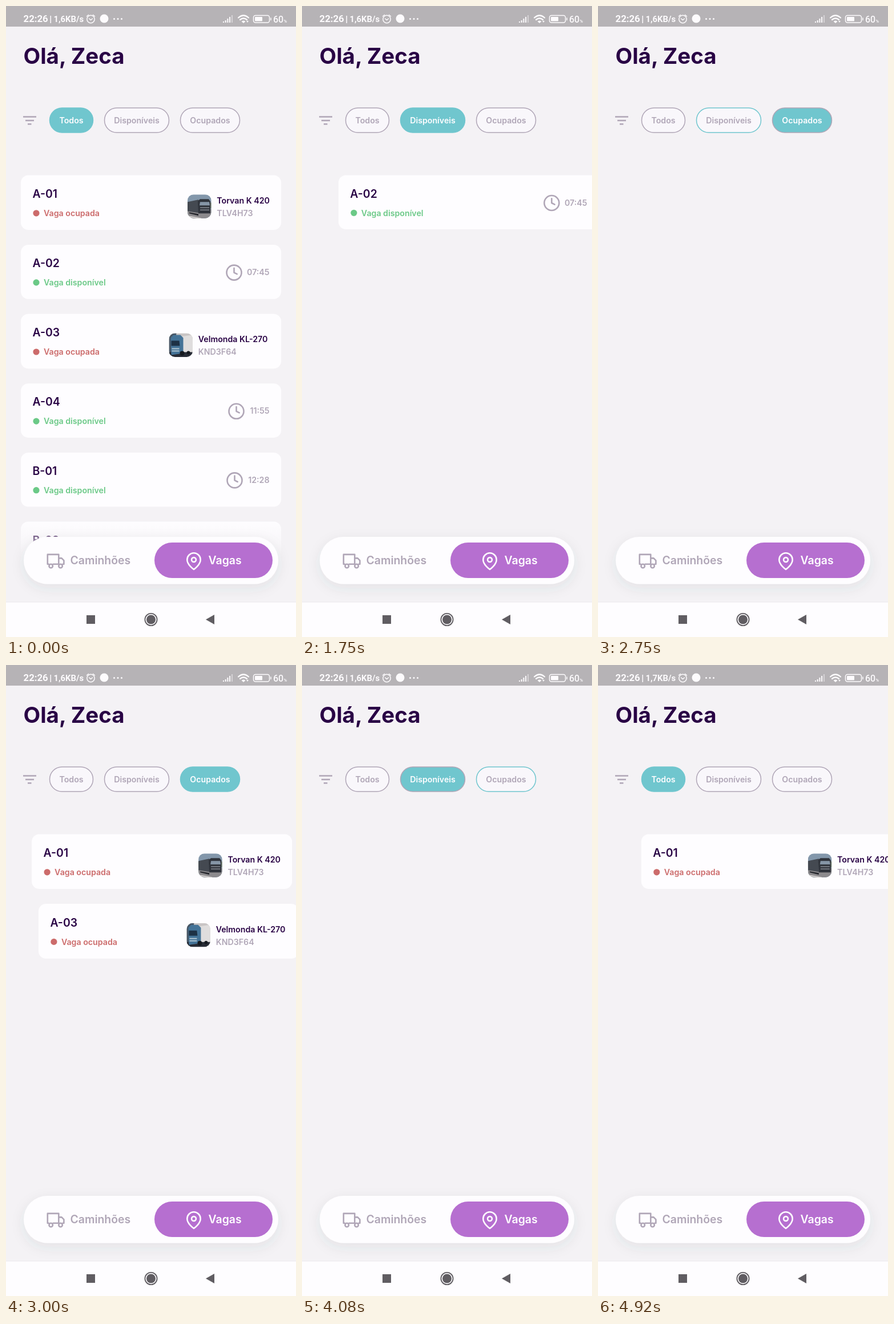
Recreate the animation shown at these times as an HTML page. Size 508 by 1102 pixels, loop 5010 ms.

```html
<!DOCTYPE html>
<html lang="pt">
<head>
<meta charset="utf-8">
<style>
  html, body { margin: 0; width: 100%; height: 100%; overflow: hidden; background: #f4f2f5; }
  svg { display: block; width: 100%; height: 100%; font: 600 14.2px Inter, sans-serif; }
  .title { font-size: 19.4px; fill: #290345; }
  .dark { fill: #290345; }
  .grey { fill: #b0a6b7; }
  .line { fill: none; stroke-width: 2; stroke-linecap: round; stroke-linejoin: round; }
  .greyLine { stroke: #b0a6b7; }
  .card { fill: #fefdff; }
  .status text { font-family: Roboto, sans-serif; font-weight: 600; fill: #fdfbfd; }
</style>
</head>
<body>
<svg viewBox="0 0 508 1102">
  <defs>
    <linearGradient id="fade" x2="0" y2="1">
      <stop stop-color="#f4f2f5" stop-opacity="0"/>
      <stop offset="1" stop-color="#f4f2f5"/>
    </linearGradient>
    <filter id="shadow" x="-20%" y="-60%" width="140%" height="220%">
      <feDropShadow dx="0" dy="7" stdDeviation="11" flood-color="#405848" flood-opacity=".09"/>
    </filter>
    <clipPath id="round"><rect width="41.5" height="41.5" rx="10.5"/></clipPath>
    <g id="clock" class="line greyLine">
      <circle r="10"/><path d="M0-6V0l4 2"/>
    </g>
    <g id="darkTruck" clip-path="url(#round)">
      <rect width="42" height="42" fill="#8397ab"/>
      <path d="M0 14H42V24H0Z" fill="#75806f"/>
      <path d="M0 27L42 25V42H0Z" fill="#8c8a8d"/>
      <path d="M0 13L19 9V32L0 29Z" fill="#444951"/>
      <path d="M18 11l4-3H37l3 4V33H19Z" fill="#30343c"/>
      <path d="M22 13H38l1 6H21Z" fill="#8696a7"/>
      <path d="M22 23H38M22 27H38" stroke="#858991" stroke-width="1.5"/>
      <path d="M3 31l16 3v3L3 33Z" fill="#25272d"/>
      <path d="M0 38L24 42" stroke="#dad7d5" stroke-width="2"/>
    </g>
    <g id="blueTruck" clip-path="url(#round)">
      <rect width="42" height="42" fill="#c9c5c5"/>
      <path d="M0 0H13L7 42H0Z" fill="#485767"/>
      <path d="M20 6L42 3V34H20Z" fill="#dfdddd"/>
      <path d="M0 33H42V42H0Z" fill="#282c36"/>
      <path d="M3 8L8 3H20l5 5V35L4 38Z" fill="#447397"/>
      <path d="M4 13H18l1 9H4Z" fill="#1d3145"/>
      <path d="M5 27H18M5 31H18" stroke="#b0c5d2" stroke-width="2"/>
      <circle cx="23" cy="35" r="4" fill="#15191f"/>
      <circle cx="34" cy="34" r="3" fill="#15191f"/>
    </g>
  </defs>

  <rect width="508" height="1102" fill="#f4f2f5"/>
  <text class="dark" x="30.5" y="100.5" style="font-size:38.5px;font-weight:700">Olá, Zeca</text>
  <path d="M30 193.5H53M34 200H49M38 206.3H44.500" stroke="#b0a6b7" stroke-width="2.6"/>
  <g id="tabs"></g>
  <g id="lists"></g>

  <rect y="900" width="508" height="65" fill="url(#fade)"/>
  <rect y="965" width="508" height="80" fill="#f4f2f5"/>
  <rect x="31" y="927" width="446" height="82.500" rx="41.2" class="card" filter="url(#shadow)"/>
  <rect x="260" y="937" width="207" height="62" rx="31" fill="#b66fd0"/>
  <g class="line greyLine" transform="translate(71.500 954) scale(1.3)">
    <path d="M2.500 16H1V3H16V16H8.500M16 8h4l3 3v5h-1.500"/>
    <circle cx="5.500" cy="18.500" r="2.500"/><circle cx="18.500" cy="18.500" r="2.500"/>
  </g>
  <text class="grey" x="112.500" y="975" style="font-size:19.4px">Caminhões</text>
  <g class="line" stroke="#fefdff" transform="translate(313.400 954) scale(1.3)">
    <path d="M21 10c0 7-9 13-9 13s-9-6-9-13a9 9 0 0 1 18 0z"/><circle cx="12" cy="10" r="3"/>
  </g>
  <text x="354.500" y="975" fill="#fefdff" style="font-size:19.4px">Vagas</text>

  <rect y="1041" width="508" height="61" fill="#fefdff"/>
  <rect y="1040.500" width="508" height="1" fill="#ebe9ec"/>
  <g fill="#605d62">
    <rect x="141" y="1064" width="15" height="15"/>
    <circle cx="254" cy="1071.500" r="8"/>
    <circle cx="254" cy="1071.500" r="10.600" fill="none" stroke="#605d62" stroke-width="1.800"/>
    <path d="M350 1071.500L365 1063V1080Z"/>
  </g>

  <g class="status">
    <rect width="508" height="36" fill="#b6b3b6"/>
    <text x="30.500" y="28" style="font-size:16.800px">22:26</text>
    <rect x="77.500" y="17" width="1.500" height="13" fill="#fdfbfd"/>
    <text id="speed" x="83.500" y="28" style="font-size:14.800px"></text>
    <g fill="none" stroke="#fdfbfd" stroke-width="1.500" stroke-linecap="round">
      <circle cx="148.500" cy="23" r="6.700"/>
      <path d="M141.500 18l3-2.500M155.500 18l-3-2.500M145.500 22l3 2.500 3-2.500"/>
      <path d="M407 20.500q9-8 18 0M410 24q6-5 12 0" stroke-width="2.300"/>
      <rect x="433.500" y="16.500" width="28" height="12.500" rx="3.500"/>
      <path d="M464 21v3.500"/>
    </g>
    <g fill="#fdfbfd">
      <circle cx="172" cy="22" r="7.500"/>
      <circle cx="189.500" cy="22.500" r="1.500"/><circle cx="196" cy="22.500" r="1.500"/><circle cx="202.500" cy="22.500" r="1.500"/>
      <path d="M380 27h2v2h-2zM383.700 25h2v4h-2zM387.400 22h2v7h-2zM391.100 19h2v10h-2z"/>
      <path d="M395 16h2v13h-2z" opacity=".45"/>
      <path d="M412.500 27q3.500-3 7 0l-3.500 3zM421 26h4l-2 3z"/>
      <rect x="436" y="19" width="13" height="7.500" rx="1"/>
    </g>
    <text x="468" y="28.500" style="font-size:16px;font-weight:500">60</text>
    <text x="486.500" y="28.500" style="font-size:7.500px">%</text>
  </g>
</svg>
<script>
const LOOP = 5010, SHIFT = 50.8, SLIDE = 300, STAGGER = 50;
const TEAL = '#70c6ce', GREY = '#b0a6b7';
const $ = id => document.getElementById(id);

const spots = [
  { id: 'A-01', truck: 'Torvan K 420', plate: 'TLV4H73', photo: 'darkTruck', x: 318 },
  { id: 'A-02', time: '07:45', x: 399.5 },
  { id: 'A-03', truck: 'Velmonda KL-270', plate: 'KND3F64', photo: 'blueTruck', x: 285.5 },
  { id: 'A-04', time: '11:55', x: 403.5 },
  { id: 'B-01', time: '12:28', x: 400.5 },
  { id: 'B-02', time: '12:28', x: 400.5 },
];
const tabs = [
  { label: 'Todos', x: 76.5, w: 76, keep: () => true },
  { label: 'Disponíveis', x: 172.5, w: 113, keep: s => s.time },
  { label: 'Ocupados', x: 305.5, w: 104, keep: s => s.truck },
];
// tap time, chosen tab, moment the first card appears
const taps = [
  [0, 0, -LOOP], [1580, 1, 1710], [2750, 2, 2885], [4080, 1, 4132], [4830, 0, 4918],
];

function cardMarkup(s, y) {
  const h = s.time ? 94.6 : 95.6, dy = s.time ? 0 : .5;
  const color = s.time ? '#6bc987' : '#cc6b6b';
  const side = s.time
    ? `<use href="#clock" transform="translate(${s.x} 48.5) scale(1.3)"/>
       <text class="grey" x="461.500" y="53" text-anchor="end">${s.time}</text>`
    : `<use href="#${s.photo}" x="${s.x}" y="33.700"/>
       <text class="dark" x="${s.x + 51.3}" y="49.500">${s.truck}</text>
       <text class="grey" x="${s.x + 51.3}" y="71.500">${s.plate}</text>`;
  return `<g><g transform="translate(0 ${y})">
    <rect class="card" x="26" width="456" height="${h}" rx="13"/>
    <text class="title" x="46.500" y="${39 + dy}">${s.id}</text>
    <circle cx="53" cy="${65.8 + dy}" r="5.600" fill="${color}"/>
    <text x="66" y="${71 + dy}" fill="${color}">Vaga ${s.time ? 'disponível' : 'ocupada'}</text>
    ${side}</g></g>`;
}

function listMarkup(tab) {
  let y = 295.5;
  return '<g>' + spots.filter(tab.keep).map(s => {
    const card = cardMarkup(s, y);
    y += s.time ? 120.6 : 121.6;
    return card;
  }).join('') + '</g>';
}

$('tabs').innerHTML = tabs.map(t => `<g>
  <rect x="${t.x}" y="178" width="${t.w}" height="43" rx="21.500" stroke-width="1.500"/>
  <text x="${t.x + t.w / 2}" y="205.300" text-anchor="middle">${t.label}</text></g>`).join('');
$('lists').innerHTML = tabs.map(listMarkup).join('');

function draw(t) {
  const step = taps.findLastIndex(tap => t >= tap[0]);
  const [at, active, start] = taps[step];
  // borders follow the fill a moment late
  const bordered = step && t - at < 80 ? taps[step - 1][1] : active;

  [...$('tabs').children].forEach((g, i) => {
    const [pill, label] = g.children;
    pill.setAttribute('fill', i === active ? TEAL : '#f9f7fb');
    pill.setAttribute('stroke', i === bordered ? TEAL : GREY);
    label.setAttribute('fill', i === active ? '#fefdff' : GREY);
  });

  [...$('lists').children].forEach((list, i) => {
    list.style.display = i === active ? '' : 'none';
    if (i !== active) return;
    [...list.children].forEach((card, n) => {
      const p = (t - start - n * STAGGER) / SLIDE;
      card.style.display = p < 0 ? 'none' : '';
      const x = SHIFT * (1 - Math.min(Math.max(p, 0), 1)) ** 2;
      card.setAttribute('transform', `translate(${x} 0)`);
    });
  });

  $('speed').textContent = t < 4500 ? '1,6KB/s' : '1,7KB/s';
}

const begin = performance.now();
function tick() {
  draw((performance.now() - begin) % LOOP);
  requestAnimationFrame(tick);
}
tick();
</script>
</body>
</html>
```
